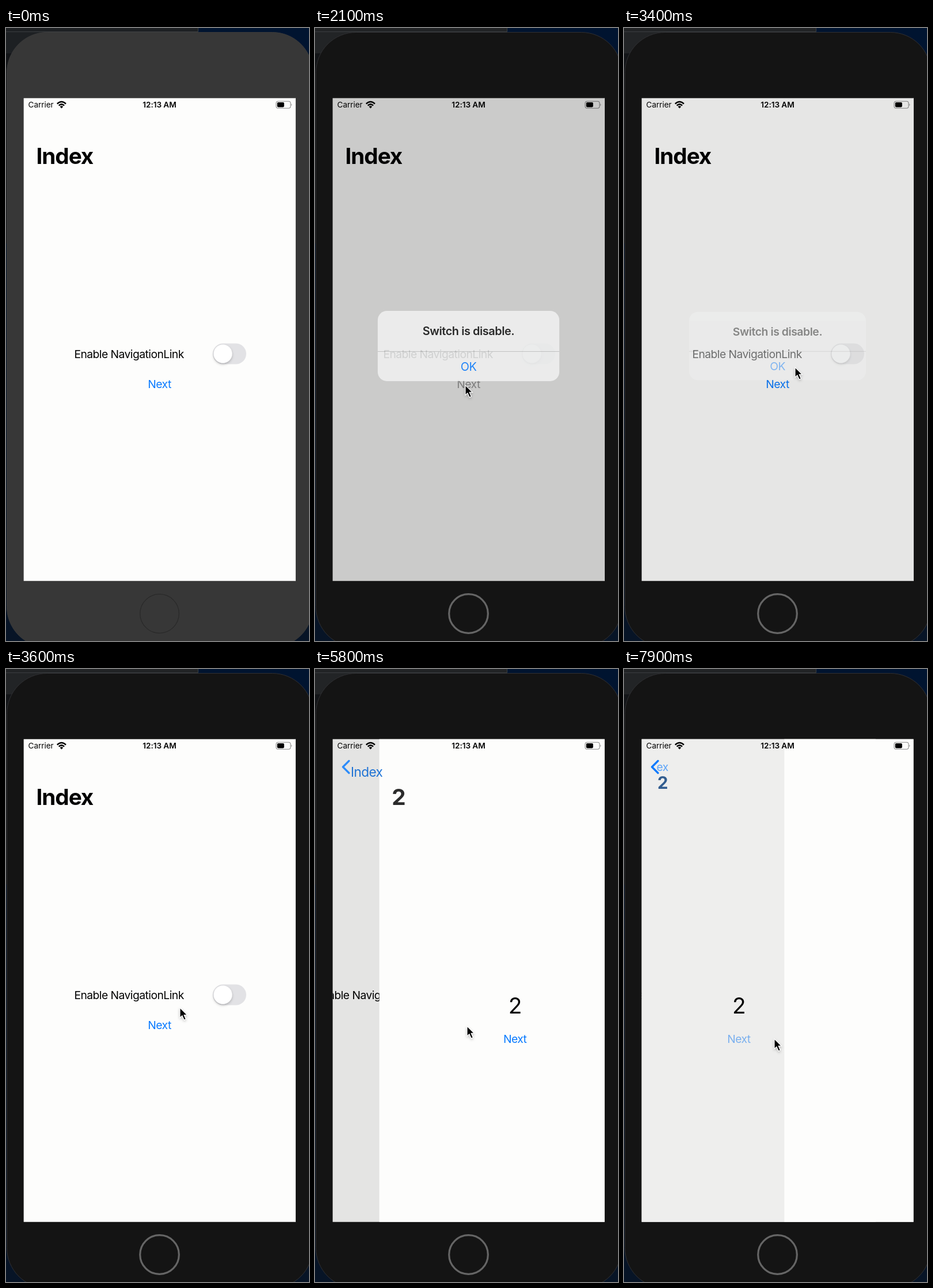
Recreate the animation shown at these times as an HTML page. Size 526 by 1064 pixels, loop 8 s.

```html
<!DOCTYPE html>
<html lang="en">
<head>
<meta charset="utf-8">
<title>Navigation demo</title>
<style>
  html, body { margin: 0; width: 100%; height: 100%; overflow: hidden; background: #00102c; }
  svg { display: block; width: 526px; height: 1064px; }
  text { font-family: Inter, Roboto, sans-serif; font-size: 19.3px; letter-spacing: -.028em; white-space: pre; }
  .mid { text-anchor: middle; }
  .big { font-size: 38.7px; }
  .bold { font-weight: 700; }
  .semi { font-weight: 600; letter-spacing: -.02em; }
  .status { font-size: 13.6px; letter-spacing: -.004em; }
  .blue { fill: #087aff; }
</style>
</head>
<body>
<svg viewBox="0 0 526 1064">
  <defs>
    <clipPath id="screenClip"><rect x="30.7" y="121.7" width="471.8" height="838"/></clipPath>
    <clipPath id="backClip"><rect x="56" y="150" width="446" height="40"/></clipPath>
    <linearGradient id="desktop" x2="0" y2="1">
      <stop stop-color="#001430"/>
      <stop offset="1" stop-color="#071426"/>
    </linearGradient>
    <filter id="soft" x="-50%" y="-50%" width="200%" height="200%">
      <feDropShadow dx="0" dy="2" stdDeviation="2" flood-opacity=".25"/>
    </filter>
  </defs>

  <rect width="526" height="1064" fill="url(#desktop)"/>
  <rect id="backWindow" width="333" height="44"/>
  <rect y="44" width="40" height="330" fill="#131518"/>
  <path d="M0 6.5H333.5V0" fill="none" stroke="#3b3e41"/>
  <rect id="body" x="1.5" y="7.5" width="531" height="1067" rx="70"/>
  <circle id="home" cx="266.5" cy="1016.5" r="33.8" fill="none"/>

  <g clip-path="url(#screenClip)">
    <rect x="30" y="121" width="474" height="840" fill="#fdfdfc"/>

    <g id="page1">
      <text x="118.4" y="572.5">Enable NavigationLink</text>
      <rect id="track" x="359" y="547.5" width="58" height="36" rx="18"/>
      <circle id="knob" cy="565.5" r="16" fill="#fff" filter="url(#soft)"/>
      <text id="next1" class="mid" x="266.5" y="624.5">Next</text>
    </g>
    <rect id="pageDim" x="30" y="121" width="474" height="840"/>

    <g id="page2">
      <rect x="31" y="121" width="473" height="840" fill="#fdfdfc"/>
      <text class="mid big" x="266.5" y="598">2</text>
      <text id="next2" class="mid blue" x="266.5" y="648.5">Next</text>
    </g>
    <rect id="pageDim2" x="30" y="121" width="474" height="840"/>

    <g id="page3">
      <rect x="31" y="121" width="473" height="840" fill="#fdfdfc"/>
    </g>

    <path id="chevron" d="M59 159.5L48.5 170L59 180.5" fill="none" stroke="#087aff" stroke-width="3.4" stroke-linecap="round" stroke-linejoin="round"/>
    <g clip-path="url(#backClip)"><text id="oldBack" class="blue" y="176.5">Index</text></g>
    <text id="title1" class="bold">Index</text>
    <text id="title2" class="bold">2</text>

    <g id="statusBar">
      <text class="status" x="38.5" y="138.3">Carrier</text>
      <g fill="none" stroke="#000" stroke-width="2.5">
        <path d="M88.8 131.6Q96.4 124.4 104 131.6"/>
        <path d="M91.7 134.7Q96.4 130.1 101.1 134.7"/>
      </g>
      <path d="M93.6 136.5Q96.4 134 99.2 136.5L96.4 139.4Z"/>
      <text class="status semi mid" x="266.5" y="138.3">12:13 AM</text>
      <rect x="469" y="127.2" width="25" height="12" rx="3.4" fill="none" stroke="#8a8a8a" stroke-width="1.1"/>
      <rect x="470.8" y="129" width="12" height="8.4" rx="1.8"/>
      <path d="M495.4 131.2Q497.4 133.2 495.4 135.2Z" fill="#8a8a8a"/>
    </g>

    <rect id="alertDim" x="30" y="121" width="474" height="840"/>
    <g id="alert">
      <rect x="-153.5" y="-59.3" width="307" height="118.6" rx="15.5" fill="#f0f1f1"/>
      <path d="M-153.5 9.3H153.5" stroke="#000" stroke-opacity=".2"/>
      <text class="mid semi" y="-18.5" fill="#111">Switch is disable.</text>
      <text class="mid blue" y="41.5">OK</text>
    </g>
  </g>

  <path id="cursor" d="M0 0V17.2L3.9 13.6L7.2 21L10.3 19.7L7.1 12.4H12.3Z" fill="#000" stroke="#fff" stroke-width="1.1" filter="url(#soft)"/>
</svg>
<script>
const LOOP = 8000, STEP = 100, WIDTH = 471;
const ACTIVATE = 1800, ALERT_IN = 1880, ALERT_OUT = 3290, TOGGLE = 4250, PUSH_1 = 5600, PUSH_2 = 7800;

// Each move: start, end, target x, target y
const moves = [
  [250, 1000, 261, 620],
  [2400, 3050, 297, 589],
  [3500, 4150, 375, 574],
  [4750, 5350, 264, 620],
  [6600, 7300, 261, 642]
];

const el = {};
document.querySelectorAll('[id]').forEach(node => el[node.id] = node);

const clamp = v => Math.max(0, Math.min(1, v));
const ramp = (t, from, to) => clamp((t - from) / (to - from));
const mix = (a, b, k) => a + (b - a) * k;
const mixColor = (a, b, k) => `rgb(${a.map((v, i) => Math.round(mix(v, b[i], k)))})`;
const smooth = k => k * k * (3 - 2 * k);
const spring = (t, start, rate) => {
  const s = Math.max(0, t - start) / 1000 * rate;
  return 1 - (1 + s) * Math.exp(-s);
};
const set = (node, attrs) => {
  for (const name in attrs) node.setAttribute(name, attrs[name]);
};
const shift = (node, x) => set(node, { transform: `translate(${x} 0)` });

// A large title shrinks into the back button as k goes from 0 to 1.
function placeTitle(node, k, enterX, opacity) {
  set(node, {
    x: mix(52.6, 64, k) + enterX,
    y: mix(236, 176.5, k),
    fill: mixColor([0, 0, 0], [8, 122, 255], k),
    opacity: opacity * (1 - .8 * k * (1 - k))
  });
  node.style.fontSize = mix(38.7, 19.3, k) + 'px';
  node.style.fontWeight = k > .75 ? 400 : 700;
}

function cursorAt(t) {
  let x = 500, y = 29;
  for (const [from, to, toX, toY] of moves) {
    const k = smooth(ramp(t, from, to));
    x = mix(x, toX, k);
    y = mix(y, toY, k);
  }
  return `translate(${x} ${y})`;
}

function render(t) {
  const active = t >= ACTIVATE;
  set(el.body, { fill: active ? '#141414' : '#373737', stroke: active ? '#303033' : '#3a3a3a' });
  set(el.home, { stroke: active ? '#656565' : '#292929', 'stroke-width': active ? 3.2 : 1.2 });
  set(el.backWindow, { fill: active ? '#222426' : '#1d2023' });

  const shown = spring(t, ALERT_IN, 16);
  const fade = 1 - ramp(t, ALERT_OUT, ALERT_OUT + 200);
  const alerting = t >= ALERT_IN && t < ALERT_OUT;
  set(el.alert, {
    transform: `translate(266.5 552) scale(${mix(1.2, 1, shown)})`,
    opacity: shown * fade
  });
  set(el.alertDim, { opacity: .2 * ramp(t, ALERT_IN, ALERT_IN + 220) * fade });

  set(el.knob, { cx: mix(376.5, 399.7, spring(t, TOGGLE, 30)) });
  set(el.track, { fill: mixColor([226, 226, 229], [52, 199, 89], ramp(t, TOGGLE + 50, TOGGLE + 420)) });

  const p1 = spring(t, PUSH_1, 16), p2 = spring(t, PUSH_2, 16);
  shift(el.page1, -.3 * WIDTH * p1);
  shift(el.page2, WIDTH * (1 - p1) - .3 * WIDTH * p2);
  shift(el.page3, WIDTH * (1 - p2));
  set(el.pageDim, { opacity: .12 * p1 });
  set(el.pageDim2, { opacity: .12 * p2 });
  set(el.next1, { fill: alerting ? '#9a9a9a' : '#087aff', opacity: p1 > 0 ? .5 : 1 });
  set(el.next2, { opacity: p2 > 0 ? .5 : 1 });

  const settled = t >= PUSH_1 + 600;
  placeTitle(el.title1, p1, 0, settled ? 0 : 1);
  placeTitle(el.title2, p2, WIDTH * (1 - p1), p1);
  set(el.chevron, { opacity: p1 });
  set(el.oldBack, { x: 64 - 72 * p2, opacity: settled ? 1 - .8 * p2 : 0 });

  set(el.cursor, { transform: cursorAt(t), opacity: t < 100 ? 0 : 1 });
}

const began = performance.now();
function tick() {
  const t = (performance.now() - began) % LOOP;
  render(Math.floor(t / STEP) * STEP);
  requestAnimationFrame(tick);
}
tick();
</script>
</body>
</html>
```
